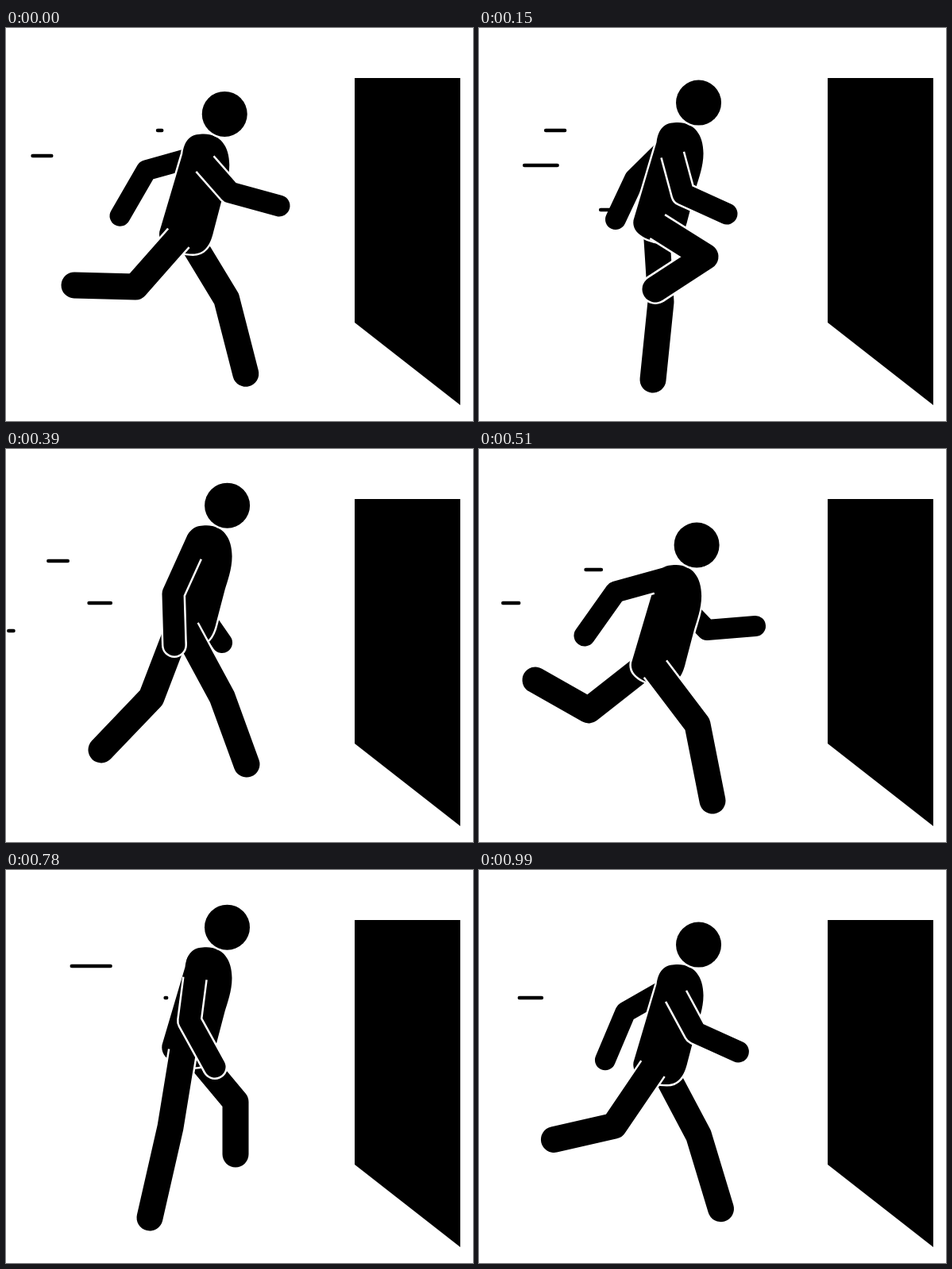
An HTML page with a canvas for the animation above (1020 ms loop, 588x495 px).

```html
<!DOCTYPE html>
<html lang="en">
<head>
<meta charset="utf-8">
<title>Running figure</title>
<style>
  html, body { margin: 0; height: 100%; overflow: hidden; background: #fff; }
  canvas { display: block; }
</style>
</head>
<body>
<canvas id="stage" width="588" height="495"></canvas>
<script>
const ctx = document.getElementById('stage').getContext('2d');
const LOOP = 1020, HALF = LOOP / 2, STEP = 30;

// One stride, shared by both sides half a loop apart: time, elbow, hand, knee, foot
const stride = [
  [0, 282, 207, 344, 224, 163, 326, 86, 324],
  [35, 287, 228, 348, 223, 138, 329, 71, 291],
  [120, 265, 233, 312, 233, 240, 357, 168, 308],
  [150, 257, 209, 312, 234, 285, 288, 222, 329],
  [270, 228, 198, 260, 248, 289, 292, 289, 358],
  [390, 210, 182, 212, 247, 272, 312, 303, 397],
  [545, 172, 180, 133, 235, 275, 347, 294, 443],
  [660, 196, 190, 172, 241, 229, 345, 219, 443],
  [780, 231, 190, 263, 248, 207, 324, 181, 438],
  [900, 245, 205, 272, 244, 183, 313, 120, 379]
];

// y, time at mid-flight, greatest length, half of its life
const dashes = [
  [161, 936, 36], [129, 144, 29], [173, 116, 50, 110], [229, 246, 32],
  [141, 337, 32], [194, 418, 33], [152, 578, 28], [121, 791, 54]
];

const torso = new Path2D('M-53 50C-50 28-39 25-26 25C-6 25 6 40 6 64C6 80 0 96-3 106L-14 148C-18 166-26 176-40 176C-62 176-85 166-82 148Z');

function keyAt(i) {
  const n = stride.length, k = stride[(i + n) % n];
  return [k[0] + Math.floor(i / n) * LOOP, ...k.slice(1)];
}

// Smooth cubic through the stride, closed over the loop
function limbsAt(time) {
  const t = time % LOOP, i = stride.findLastIndex(k => k[0] <= t);
  const [a, b, c, d] = [-1, 0, 1, 2].map(o => keyAt(i + o));
  const span = c[0] - b[0], s = (t - b[0]) / span;
  const v = b.map((p, j) => {
    const m = (c[j] - a[j]) / (c[0] - a[0]) * span;
    const n = (d[j] - p) / (d[0] - b[0]) * span;
    const e = c[j] - p;
    return p + s * (m + s * (3 * e - 2 * m - n + s * (m + n - 2 * e)));
  });
  return { elbow: v.slice(1, 3), hand: v.slice(3, 5), knee: v.slice(5, 7), foot: v.slice(7, 9) };
}

function headAt(t) {
  const a = 2 * Math.PI * (t - 60) / HALF;
  const y = 89 + 25 * Math.cos(a) + 10 * Math.cos(2 * a);
  return [285 - y * .09, y];
}

function stroke(pts, width, color, cap) {
  ctx.beginPath();
  pts.forEach(p => ctx.lineTo(...p));
  ctx.lineWidth = width;
  ctx.strokeStyle = color;
  ctx.lineCap = cap;
  ctx.lineJoin = 'round';
  ctx.stroke();
}

function disc(x, y, r, color) {
  ctx.beginPath();
  ctx.arc(x, y, r, 0, 7);
  ctx.fillStyle = color;
  ctx.fill();
}

// The white rim starts a little below the root so the limb merges with the body
function limb(root, mid, end, width, rim) {
  if (rim !== undefined) {
    const dx = mid[0] - root[0], dy = mid[1] - root[1], k = rim / Math.hypot(dx, dy);
    stroke([[root[0] + dx * k, root[1] + dy * k], mid, end], width + 5, '#fff', 'butt');
    disc(...end, width / 2 + 2.5, '#fff');
  }
  stroke([root, mid, end], width, '#000', 'round');
}

function drawDash(t, [y, mid, size, life = 162]) {
  const age = (t - mid + LOOP + HALF) % LOOP - HALF;
  if (Math.abs(age) >= life) return;
  const x = 100 - .65 * age;
  const half = Math.max(.5, size * Math.cos(Math.PI / 2 * age / life) ** .6 / 2 - 2.5);
  stroke([[x - half, y], [x + half, y]], 4.5, '#000', 'round');
}

function drawTorso(x, y) {
  ctx.save();
  ctx.translate(x, y);
  ctx.lineWidth = 5;
  ctx.strokeStyle = '#fff';
  ctx.fillStyle = '#000';
  ctx.stroke(torso);
  ctx.fill(torso);
  ctx.restore();
}

function drawRunner(time) {
  // The second step lands slightly early
  const t = time + 35 * Math.exp(-(((time - HALF) / 50) ** 2));
  const [x, y] = headAt(t), near = limbsAt(t), far = limbsAt(t + HALF);
  const shoulder = x - 38, hip = x - 55;

  limb([shoulder, y + 54], far.elbow, far.hand, 26);
  limb([hip + (far.knee[0] - hip) * .2, y + 157], far.knee, far.foot, 33);
  drawTorso(x, y);
  limb([hip + (near.knee[0] - hip) * .05, y + 156], near.knee, near.foot, 33, 0);
  limb([shoulder, y + 45 + (near.elbow[0] - shoulder) * .06], near.elbow, near.hand, 27, 20);
  disc(x, y, 31, '#fff');
  disc(x, y, 28.5, '#000');
}

function drawDoor() {
  ctx.beginPath();
  [[439, 63], [572, 63], [572, 475], [439, 371]].forEach(p => ctx.lineTo(...p));
  ctx.fillStyle = '#000';
  ctx.fill();
}

function frame(now) {
  const t = Math.floor(now % LOOP / STEP) * STEP;
  ctx.fillStyle = '#fff';
  ctx.fillRect(0, 0, 588, 495);
  dashes.forEach(d => drawDash(t, d));
  drawRunner(t);
  drawDoor();
  requestAnimationFrame(frame);
}
frame(0);
</script>
</body>
</html>
```
